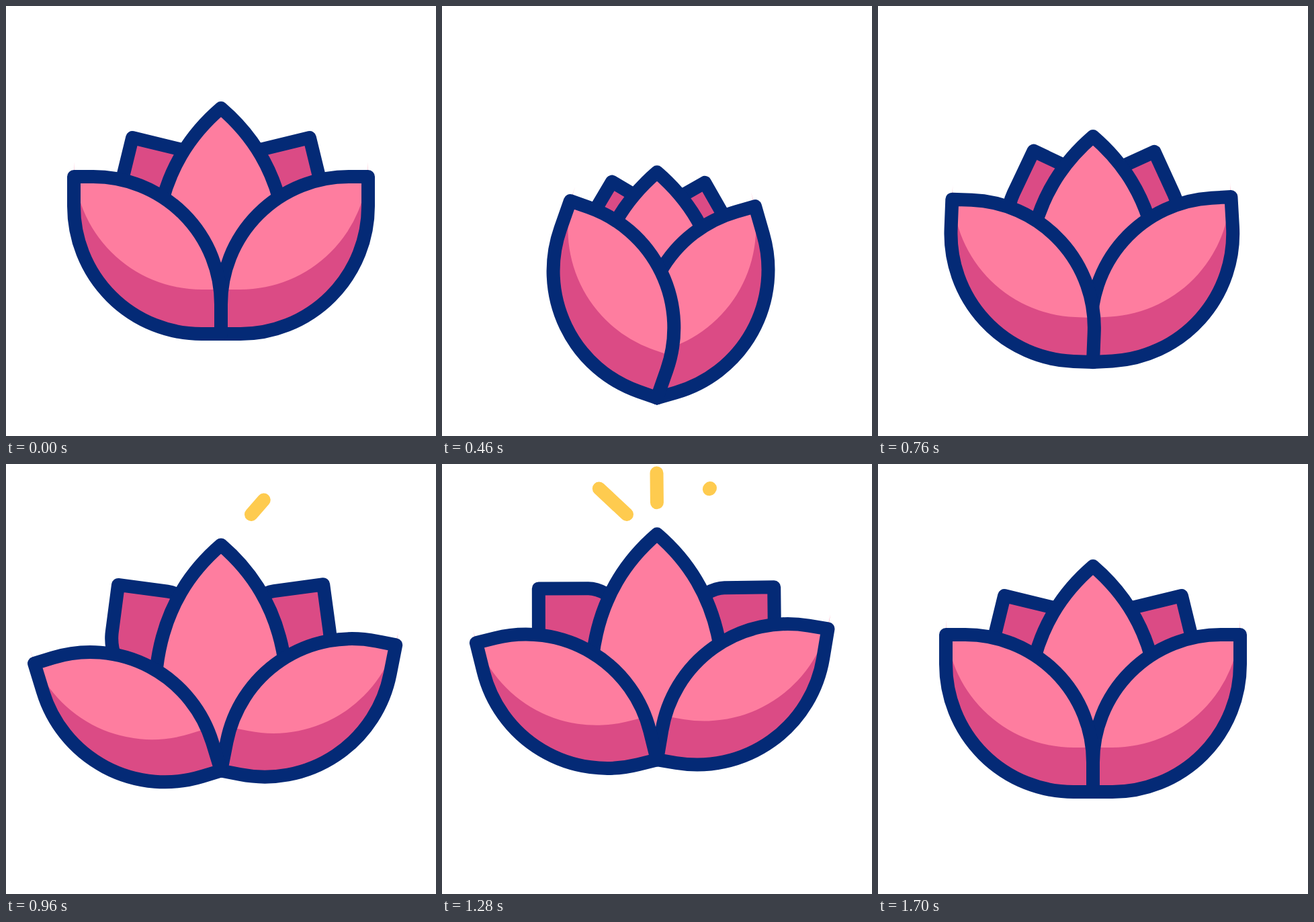
Animation of 640 by 640 pixels, one loop 2.4 s. Source, as an HTML page:

```html
<!DOCTYPE html>
<html lang="en">
<head>
<meta charset="utf-8">
<title>Lotus</title>
<style>
  html, body { margin: 0; height: 100%; overflow: hidden; background: #fff; }
  svg { display: block; width: 100%; height: 100%; }
  .light { fill: #fe7d9f; }
  .dark { fill: #db4b85; }
  .clear { fill: none; }
  .line { stroke: #042a76; stroke-width: 20; stroke-linejoin: round; }
  .ray { stroke: #fecb4f; stroke-width: 20; stroke-linecap: round; }
</style>
</head>
<body>
<svg viewBox="0 0 640 640">
  <defs>
    <path id="back" class="line dark" d="M-176-165H-102C-70-165-20-120 0-60V0H-62C-120 0-176-40-176-95Z"/>
    <path id="leaf" d="M-219-234H-190A190 190 0 0 1 0-44V0H-29A190 190 0 0 1-219-190Z"/>
    <g id="front">
      <use href="#leaf" class="dark"/>
      <path class="light" d="M-219-234H-190A190 190 0 0 1 0-44V-66H-29A190 190 0 0 1-219-256Z"/>
      <use href="#leaf" class="line clear"/>
    </g>
  </defs>
  <line class="ray"/><line class="ray"/><line class="ray"/>
  <g id="flower">
    <use id="backRight" href="#back"/>
    <use id="backLeft" href="#back"/>
    <path class="line light" d="M0-336C-42-300-85-245-96-153C-98-88-50-28 0 0C50-28 98-88 96-153C85-245 42-300 0-336Z"/>
    <use id="frontRight" href="#front"/>
    <use id="frontLeft" href="#front"/>
  </g>
</svg>
<script>
const LOOP = 2400, STEP = 20, OPENING = 580, BACK_LAG = 80, BACK_REST = 13.7;
const el = id => document.getElementById(id);
const rayLines = document.querySelectorAll('.ray');

const rays = [
  { side: 1, end: [399, 36], start: 880 },
  { side: 0, end: [319.5, 13.5], start: 960 },
  { side: -1, end: [229, 32], start: 1160 }
];

function ease(t, start, span) {
  const x = Math.min(1, Math.max(0, (t - start) / span));
  return x * x * (3 - 2 * x);
}

// Offset from rest: out to closed, across to open, then back to zero.
function swing(t, closed, open, span = 500, hold = 0) {
  const opened = span + OPENING;
  return closed * ease(t, 0, span)
    + (open - closed) * ease(t, span, OPENING)
    - open * ease(t, opened + hold, span);
}

function setPetal(id, y, side, angle) {
  el(id).setAttribute('transform', `translate(0 ${y}) scale(${side} 1) rotate(${angle})`);
}

function setRay({ side, end, start }, i, t) {
  const line = rayLines[i];
  const from = [320 + 45 * side, 66 + 9 * Math.abs(side)];
  const head = ease(t, start, 150), tail = ease(t, 1040 + 170 * i, 270);
  const at = (k, axis) => from[axis] + (end[axis] - from[axis]) * k;
  line.setAttribute('visibility', head > tail ? 'visible' : 'hidden');
  line.setAttribute('x1', at(tail, 0));
  line.setAttribute('y1', at(tail, 1));
  line.setAttribute('x2', at(head, 0));
  line.setAttribute('y2', at(head, 1));
}

function draw() {
  const t = Math.floor(performance.now() % LOOP / STEP) * STEP;
  const late = t - BACK_LAG;
  el('flower').setAttribute('transform', `translate(320 ${488 + swing(t, 99, -54, 520, 70)})`);
  setPetal('backLeft', -90, 1, BACK_REST + swing(late, 19.9, -16.1));
  setPetal('backRight', -90, -1, BACK_REST + swing(late, 18.7, -15.3));
  setPetal('frontLeft', 0, 1, swing(t, 19.7, -21.6));
  setPetal('frontRight', 0, -1, swing(t, 16.3, -14.6));
  rays.forEach((ray, i) => setRay(ray, i, t));
  requestAnimationFrame(draw);
}
draw();
</script>
</body>
</html>
```
